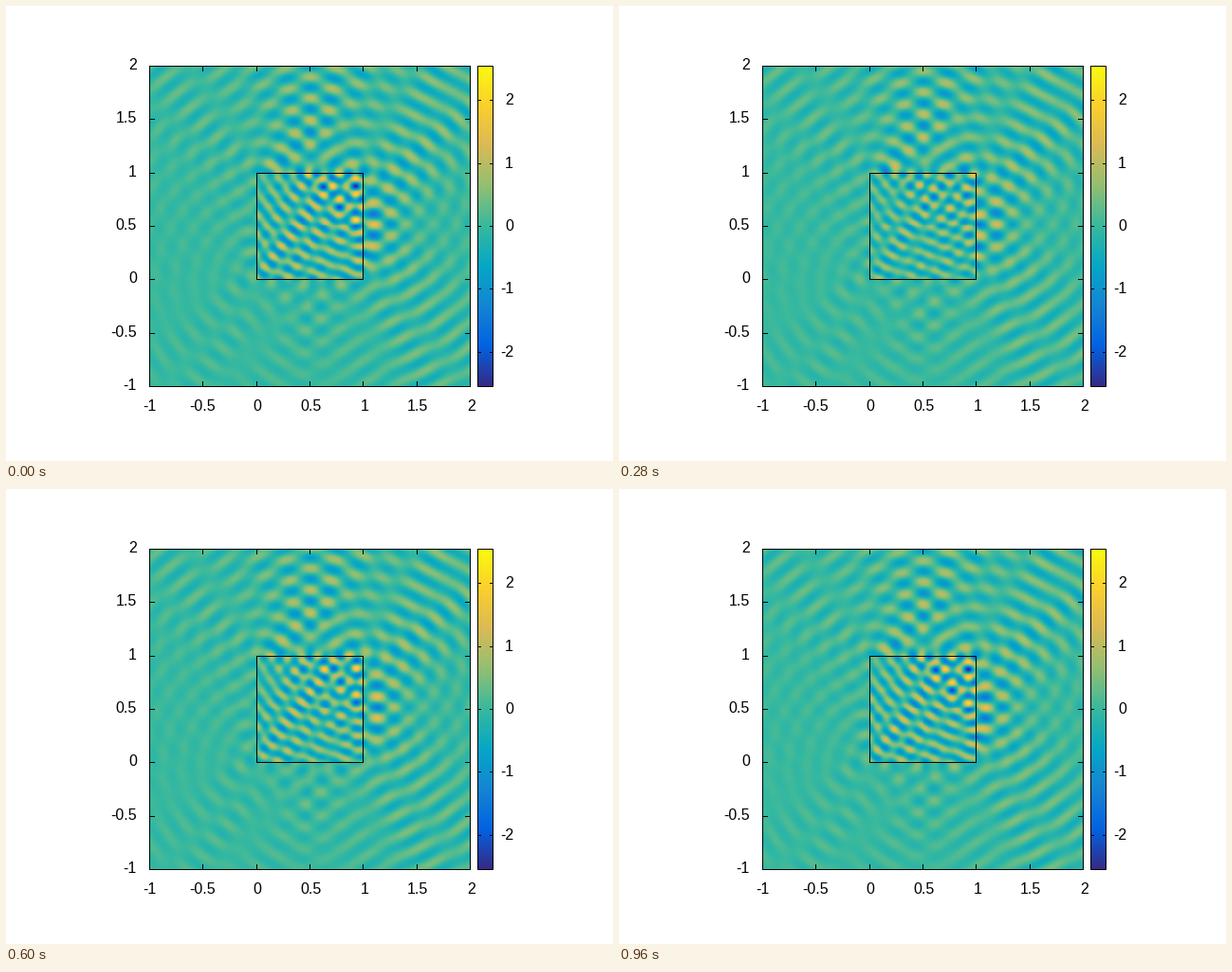
Recreate the animation shown at these times as a matplotlib script. Size 640 by 480 pixels, loop 1 s.

```python
import numpy as np
import matplotlib.pyplot as plt
from matplotlib.animation import FuncAnimation
from matplotlib.colors import LinearSegmentedColormap

FRAMES, INTERVAL = 25, 40
LIMIT = 2.55
CELLS = 113                      # grid cells per unit length
STEP = 1 / CELLS
WAVE_NUMBER = 35.0
REFRACTIVE_INDEX = 1.5
CONTRAST = REFRACTIVE_INDEX**2 - 1
ANGLE = np.radians(60)           # travel direction of the incident wave

plt.rcParams["font.family"] = "Liberation Sans"
plt.rcParams["axes.unicode_minus"] = False


def hankel0(x):
    """Hankel function of order zero, first kind, from its Laplace integral."""
    s = np.arange(0.025, 6, 0.05)
    integrand = np.exp(-s**2) / np.sqrt(1 + 0.5j * s**2 / x[:, None])
    integral = 2 / np.sqrt(np.pi) * 0.05 * integrand.sum(axis=1)
    return np.sqrt(2 / (np.pi * x)) * np.exp(1j * (x - np.pi / 4)) * integral


def green_spectrum(size):
    """FFT of the outgoing Green's function, scaled by the contrast."""
    offset = np.rint(np.fft.fftfreq(size) * size).astype(int)
    squares = offset[:, None]**2 + offset[None, :]**2
    distinct, where = np.unique(squares, return_inverse=True)
    values = np.empty(len(distinct), complex)
    values[1:] = hankel0(WAVE_NUMBER * STEP * np.sqrt(distinct[1:]))
    radius = STEP / np.sqrt(np.pi)
    log_term = np.log(WAVE_NUMBER * radius / 2) + np.euler_gamma - 0.5
    values[0] = 1 + 2j / np.pi * log_term
    kernel = 0.25j * STEP**2 * values[where].reshape(size, size)
    return np.fft.fft2(WAVE_NUMBER**2 * CONTRAST * kernel)


def scatter(source, spectrum):
    return np.fft.ifft2(np.fft.fft2(source, spectrum.shape) * spectrum)


def gmres(operator, rhs, steps):
    basis = np.zeros((steps + 1, rhs.size), complex)
    hess = np.zeros((steps + 1, steps), complex)
    norm = np.linalg.norm(rhs)
    basis[0] = rhs / norm
    for j in range(steps):
        w = operator(basis[j])
        for _ in range(2):
            part = basis[:j + 1].conj() @ w
            w = w - part @ basis[:j + 1]
            hess[:j + 1, j] += part
        hess[j + 1, j] = np.linalg.norm(w)
        basis[j + 1] = w / hess[j + 1, j]
    target = np.zeros(steps + 1, complex)
    target[0] = norm
    weights = np.linalg.lstsq(hess, target, rcond=None)[0]
    return weights @ basis[:steps]


def solve_field():
    """Total field inside the unit square, scattered field outside it."""
    axis = (np.arange(CELLS) + 0.5) * STEP
    x, y = np.meshgrid(axis, axis)
    incident = np.exp(1j * WAVE_NUMBER * (x * np.cos(ANGLE) + y * np.sin(ANGLE)))
    near = green_spectrum(240)

    def operator(flat):
        u = flat.reshape(CELLS, CELLS)
        return (u - scatter(u, near)[:CELLS, :CELLS]).ravel()

    inside = gmres(operator, incident.ravel(), 150).reshape(CELLS, CELLS)
    square = slice(CELLS, 2 * CELLS)
    source = np.zeros((3 * CELLS, 3 * CELLS), complex)
    source[square, square] = inside
    result = scatter(source, green_spectrum(480))[:3 * CELLS, :3 * CELLS]
    result[square, square] = inside
    return result * LIMIT / np.abs(inside).max()


field = solve_field()[::-1]

parula = LinearSegmentedColormap.from_list("parula", [
    "#352a87", "#0363e1", "#1485d4", "#06a7c6", "#38b99e",
    "#92bf73", "#d9ba56", "#fcce2e", "#f9fb0e"], N=512)

LEFT, RIGHT, TOP, BOTTOM = 151.5, 489.5, 63.5, 401.5
BAR_LEFT, BAR_RIGHT = 497.5, 513.5
UNIT = (RIGHT - LEFT) / 3

fig = plt.figure(figsize=(6.4, 4.8), dpi=100, facecolor="white")
ax = fig.add_axes([0, 0, 1, 1])
ax.axis("off")


def stroke(xs, ys):
    """One-pixel black line through pixel centres."""
    ax.plot(np.floor(xs) + 0.5, np.floor(ys) + 0.5, color="black", lw=0.72,
            solid_capstyle="projecting", solid_joinstyle="miter",
            snap=False, zorder=3)


def box(x0, y0, x1, y1):
    stroke([x0, x1, x1, x0, x0], [y0, y0, y1, y1, y0])


def label(x, y, text, ha):
    ax.text(x, y, text, ha=ha, va="center_baseline", fontsize=11.52)


def values(frame):
    return (field * np.exp(-2j * np.pi * frame / FRAMES)).real


image = ax.imshow(values(0), cmap=parula, vmin=-LIMIT, vmax=LIMIT,
                  extent=(LEFT, RIGHT, BOTTOM, TOP), interpolation="nearest")
ax.imshow(np.linspace(1, 0, 338)[:, None], cmap=parula, vmin=0, vmax=1,
          extent=(BAR_LEFT, BAR_RIGHT, BOTTOM, TOP), interpolation="nearest")

for value in np.arange(-1, 2.1, 0.5):
    px = LEFT + (value + 1) * UNIT
    py = BOTTOM - (value + 1) * UNIT
    stroke([px, px], [BOTTOM, BOTTOM - 5])
    stroke([px, px], [TOP, TOP + 5])
    stroke([LEFT, LEFT + 5], [py, py])
    stroke([RIGHT, RIGHT - 5], [py, py])
    label(px + (1 if value >= 0 else -0.5), 421, f"{value:g}", "center")
    label(138, py - 2.5, f"{value:g}", "right")

for value in range(-2, 3):
    py = (TOP + BOTTOM) / 2 - value * (BOTTOM - TOP) / (2 * LIMIT)
    stroke([BAR_LEFT, BAR_LEFT + 3], [py, py])
    stroke([BAR_RIGHT, BAR_RIGHT - 3], [py, py])
    label(535, py - 1.5, str(value), "right")

box(LEFT, TOP, RIGHT, BOTTOM)
box(LEFT + UNIT, TOP + UNIT, LEFT + 2 * UNIT, TOP + 2 * UNIT)
box(BAR_LEFT, TOP, BAR_RIGHT, BOTTOM)

ax.set_aspect("auto")
ax.set_xlim(0, 640)
ax.set_ylim(480, 0)


def update(frame):
    image.set_data(values(frame))
    return image,


animation = FuncAnimation(fig, update, frames=FRAMES, interval=INTERVAL,
                          repeat=True, repeat_delay=0)
plt.show()
```
